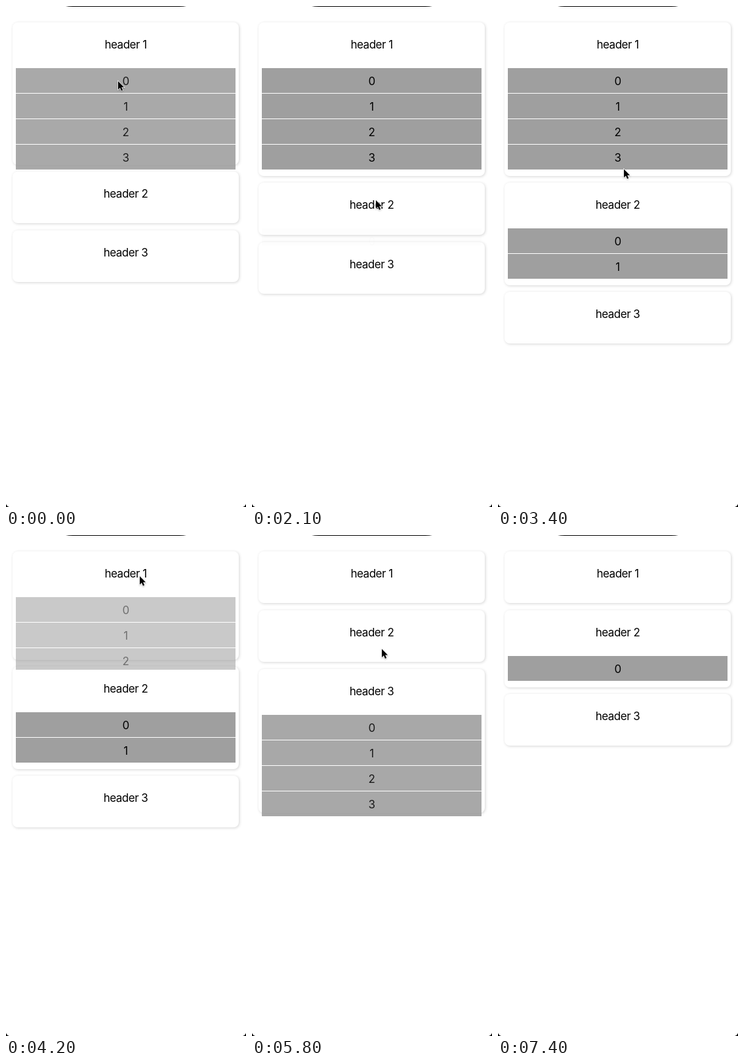
Recreate the animation shown at these times as an HTML page. Size 366 by 766 pixels, loop 8000 ms.

```html
<!DOCTYPE html>
<html lang="en">
<head>
<meta charset="utf-8">
<title>Collapsible cards</title>
<style>
  html, body { margin: 0; width: 100%; height: 100%; overflow: hidden; background: #fff; }
  #stage {
    position: relative; width: 366px; height: 766px; overflow: hidden; background: #fff;
    font: 17px/40px Inter, Roboto, sans-serif; letter-spacing: -.5px;
    color: #000; text-align: center;
  }
  #stage div { position: absolute; }
  #stage .card {
    left: 10px; width: 345px; border-radius: 8px; background: #fff;
    box-shadow: 1px 1px 4px rgba(0, 0, 0, .17);
  }
  #stage .list, #stage .header { left: 15px; width: 335px; }
  #stage .row { left: 0; width: 100%; height: 38px; background: #9f9f9f; }
  #stage .header { height: 62px; line-height: 59px; background: #fff; }
  svg { position: absolute; left: 0; top: 0; overflow: visible; }
  #cursor { filter: drop-shadow(0 1px 1px rgba(0, 0, 0, .25)); }
</style>
</head>
<body>
<div id="stage"></div>
<script>
const LOOP = 8000, STEP = 100, FADE = 300;
const TOP = 25, CLOSED = 79, PITCH = 39, LIST_TOP = 70;
const LEAD = 360, BEAT = 510;

// Pointer stops: a tap at `time` toggles `card`; repeated taps follow on the beat
const STOPS = [
  { time: -238, card: 0, x: 171, y: 115 },
  { time: 1060, card: 1, x: 189, y: 297, taps: 5 },
  { time: 4062, card: 0, x: 204, y: 63 },
  { time: 4959, card: 1, x: 200, y: 154 },
  { time: 5558, card: 2, x: 198, y: 216 },
  { time: 6165, card: 1, x: 198, y: 174 },
  { time: 6865, card: 2, x: 198, y: 262 },
  { time: 7760, x: 200, y: -24 }
];

// Rows shown at the nth opening of each card
const ROWS = [() => 4, n => n % 3 ? 2 : 1, () => 4];

const tapTimes = ROWS.map((_, card) => STOPS
  .filter(s => s.card === card)
  .flatMap(s => Array.from({ length: s.taps || 1 }, (_, k) => s.time + k * BEAT)));

const stage = document.getElementById('stage');

function add(parent, cls, text = '') {
  const el = document.createElement('div');
  el.className = cls;
  el.textContent = text;
  parent.append(el);
  return el;
}

// Layers from back to front: cards, lists, headers
const cards = ROWS.map(() => add(stage, 'card'));
const lists = ROWS.map(() => {
  const list = add(stage, 'list');
  for (let i = 0; i < 4; i++) add(list, 'row', i).style.top = i * PITCH + 'px';
  return list;
});
const headers = ROWS.map((_, i) => add(stage, 'header', 'header ' + (i + 1)));

stage.insertAdjacentHTML('beforeend', `
  <svg width="366" height="766">
    <path d="M91 0Q95 1 102 1H264Q271 1 275 0Z"/>
    <path d="M0 761Q1 765 5 766H0ZM366 761Q365 765 361 766H366Z"/>
  </svg>
  <svg id="cursor" width="12" height="18">
    <path d="M0 0V14.6L3.4 11.6 5.7 16.9 8.2 15.8 5.9 10.7H10.4Z" transform="scale(.87)"
      stroke="#fff" stroke-width="1.6" paint-order="stroke"/>
  </svg>`);
const cursor = document.getElementById('cursor');

const ease = u => {
  u = Math.min(1, Math.max(0, u));
  return u * u * (3 - 2 * u);
};

// Every odd tap opens a card, every even one closes it
function cardState(card, t) {
  const past = tapTimes[card].filter(time => time <= t);
  if (!past.length) return { p: 0, rows: 0 };
  const e = ease((t - past[past.length - 1]) / FADE);
  const rows = ROWS[card](Math.floor((past.length - 1) / 2));
  return { p: past.length % 2 ? e : 1 - e, rows };
}

// The pointer reaches each stop ahead of its tap; longer ways take longer
function pointerAt(t) {
  let { x, y } = STOPS[0];
  for (const stop of STOPS.slice(1)) {
    const dx = stop.x - x, dy = stop.y - y;
    const travel = 50 + 1.6 * Math.hypot(dx, dy);
    const e = ease(1 + (t - stop.time + LEAD) / travel);
    if (!e) break;
    x += dx * e;
    y += dy * e;
  }
  return [x, y];
}

function draw(t) {
  let y = TOP;
  ROWS.forEach((_, i) => {
    const { p, rows } = cardState(i, t);
    const height = Math.round(CLOSED + p * rows * PITCH);
    cards[i].style.top = y + 'px';
    cards[i].style.height = height + 'px';
    headers[i].style.top = y + 5 + 'px';
    lists[i].style.top = y + LIST_TOP + 'px';
    lists[i].style.opacity = p;
    [...lists[i].children].forEach((row, n) => row.hidden = n >= rows);
    y += height + Math.round(11 - p);
  });
  const [px, py] = pointerAt(t);
  cursor.style.transform = `translate(${px}px, ${py}px)`;
}

// The screen refreshes ten times a second
function tick() {
  const t = (performance.now() + 1) % LOOP;
  draw(Math.floor(t / STEP) * STEP);
  requestAnimationFrame(tick);
}
tick();
</script>
</body>
</html>
```
